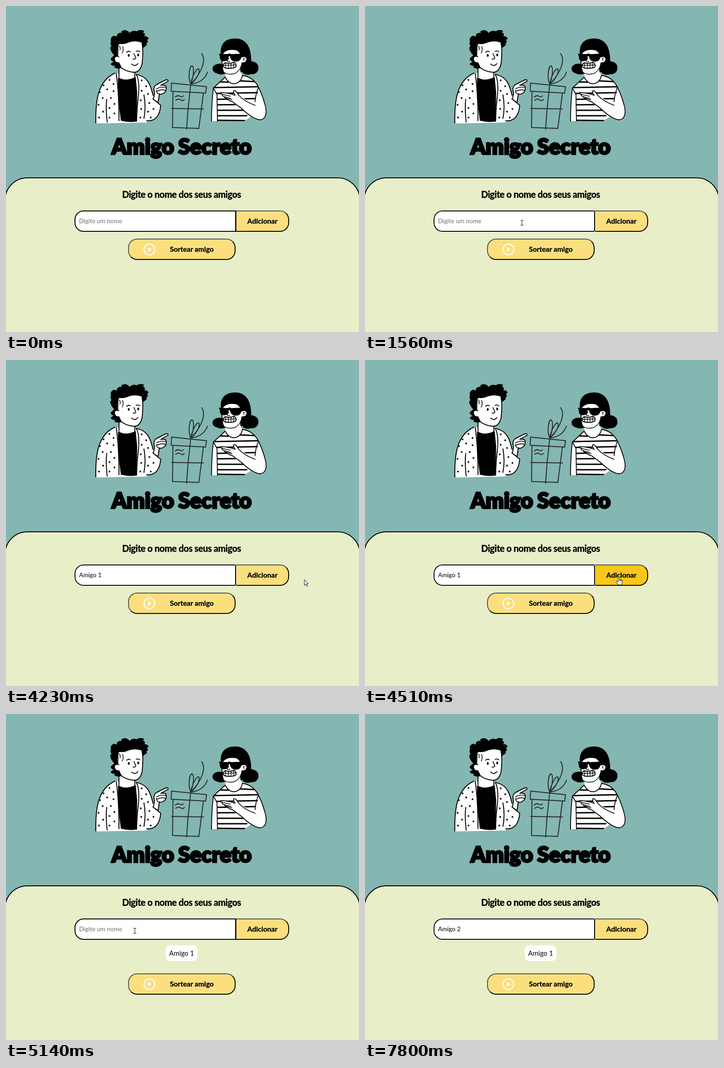
Write an HTML page that moves like this. It is 778 px wide and 719 px high and loops after 8000 ms.

```html
<!DOCTYPE html>
<html lang="pt-BR">
<head>
<meta charset="utf-8">
<title>Amigo Secreto</title>
<style>
html, body { margin: 0; width: 100%; height: 100%; overflow: hidden; background: #84b6b2; }
body { position: relative; font: 15.6px Lato, "Open Sans", sans-serif; color: #000; }
body > * { position: absolute; box-sizing: border-box; white-space: pre; text-align: center; }
#art { left: 0; top: 0; }
h1, h2 { margin: 0; left: 0; width: 774px; }
h1 { top: 279px; line-height: 60px; font-size: 47px; font-weight: 900; word-spacing: -2px; -webkit-text-stroke: 3.4px #000; }
h2 { top: 400px; line-height: 30px; font-size: 20px; letter-spacing: -.4px; -webkit-text-stroke: .4px #000; }
#panel { left: -3px; top: 378px; width: 784px; height: 400px; border: 2px solid #000; border-radius: 50px; background: #e8eec8; }
#field { left: 151px; top: 451px; width: 356px; height: 47px; border: 2px solid #000; border-radius: 20px 0 0 20px;
  background: #fff; padding-left: 8px; text-align: left; font-size: 13.6px; line-height: 43px; }
#field.focus { border-radius: 20px 3px 3px 20px; outline: 1px solid #fffc; }
#hint { color: #6e6e6e; }
#caret { position: absolute; top: 13px; width: 1px; height: 18px; background: #000; }
.btn { height: 47px; border: 2px outset #000; background: #fbdf7e; font-weight: 700; line-height: 42px; -webkit-text-stroke: .3px #000; }
.btn.hover { background: #fcc71a; }
#add { left: 506px; top: 451px; width: 118px; border-radius: 0 20px 20px 0; }
#draw { left: 269px; width: 237px; border-radius: 20px; padding-left: 44px; }
#draw svg { position: absolute; left: 31px; top: 8px; }
#chip { left: 352px; top: 510px; width: 70px; height: 35px; border-radius: 11px; background: #fff; font-size: 15px; line-height: 34px; }
#mouse { left: 0; top: 0; overflow: visible; }
</style>
</head>
<body>
<div id="panel"></div>
<svg id="art" width="778" height="378" fill="none" stroke="#000" stroke-width="2" stroke-linecap="round" stroke-linejoin="round">
  <!-- man -->
  <path fill="#fff" stroke="none" d="M198 259C197 210 202 165 240 148L290 150C312 155 318 170 324 197L340 218C340 240 330 255 312 254L309 257Z"/>
  <path d="M198 258C197 210 202 165 240 148M288 151C310 155 318 170 324 197M223 256C221 238 220 222 222 206M304 196C307 212 308 228 304 248M324 205L341 219C339 242 329 255 310 253"/>
  <path stroke-width="3.8" d="M215 175h0M228 163h0M237 172h0M223 184h0M207 190h0M237 188h0M213 203h0M231 203h0M204 218h0M239 216h0M228 225h0M214 233h0M205 246h0M239 237h0M228 246h0M299 164h0M309 177h0M299 187h0M313 194h0M297 208h0M316 214h0M298 227h0M313 233h0M325 227h0M296 246h0M319 246h0"/>
  <path fill="#fff" stroke="none" d="M249 122L285 140 287 170 248 170Z"/>
  <path fill="#000" d="M248 159Q266 168 285 158L288 190 287 254Q268 256 254 252Q247 200 248 159Z"/>
  <path d="M243 149Q249 190 249 253M287 151Q296 166 291 205Q288 232 288 254M249 137V157M284 146V157"/>
  <path fill="#fff" d="M324 205Q329 196 326 184Q326 177 332 173L352 163Q358 161 357 166L341 175Q352 173 353 179Q354 188 348 192Q342 196 338 194L335 213Z"/>
  <path d="M332 183Q340 177 351 180M333 188Q342 183 351 186M338 194Q331 193 332 186" stroke-width="1.6"/>
  <path fill="#fff" d="M247 84Q270 72 300 78Q303 100 300 127Q295 148 280 146Q264 144 254 136L246 120Z"/>
  <path fill="#000" stroke-width="1" d="M246 92Q243 102 246 112Q239 109 238 117Q240 125 249 126L253 137Q245 139 239 135L242 131Q235 133 231 128L238 122Q230 121 232 115L239 109Q231 100 230 92L233 88Q229 82 232 79Q229 69 238 66L245 68Q243 58 257 60L254 57Q260 51 269 56L272 60Q279 53 288 56L285 60Q292 50 304 55L301 59Q307 59 305 66L302 68Q311 65 314 72L310 75Q315 80 309 82L310 86 301 93L299 80Q284 75 270 80Q260 85 249 83Q247 87 246 92Z"/>
  <path fill="#fff" stroke-width="1.6" d="M249 112Q240 109 239 116Q240 126 249 125"/>
  <path stroke-width="1.5" d="M257 89Q260 97 256 104M250 88Q253 93 251 97"/>
  <path stroke-width="1.8" d="M266 102Q270 98 274 101M287 100Q291 98 295 101M282 105L286 114Q286 118 280 117M277 128Q284 135 291 127"/>
  <path stroke-width="4" d="M270.5 108v2M291.5 107v2"/>
  <!-- gift -->
  <g stroke="#242a2a">
    <path d="M365 170L442 178 440 192 364 188ZM368 190L367 268 425 270 435 193M407 174L401 230 398 272M365 226L435 227"/>
    <path d="M373 201Q378 196 383 199T391 198M374 208Q380 203 385 207T393 206"/>
    <path d="M407 172C400 155 405 132 410 132C416 135 413 158 407 172C411 152 421 136 425 139C429 148 416 166 407 172M411 168C428 150 443 121 431 105M409 172Q436 168 444 146"/>
  </g>
  <!-- woman -->
  <path fill="#000" stroke-width="1" d="M474 108Q470 72 506 72Q540 73 540 122Q557 124 556 138Q554 151 540 150Q527 154 520 145L484 148Q474 153 464 148Q454 145 456 135Q461 126 476 128Z"/>
  <path fill="#fff" stroke="none" d="M453 254Q453 215 457 181L483 157Q485 150 483 146L516 138Q516 150 522 153Q544 156 556 178Q569 205 573 228Q575 250 559 251Q548 251 540 244L524 254Z"/>
  <clipPath id="shirt"><path d="M456 181L483 157Q493 171 505 171Q518 167 522 153Q540 156 551 170L558 184 549 207 526 254H466L465 194Z"/></clipPath>
  <path clip-path="url(#shirt)" stroke-width="3" d="M460 167L490 168M512 165L555 167M455 180L560 178M455 193L560 191M460 206L560 204M460 218L560 217M460 230L560 230M460 242L560 242M460 252L560 253"/>
  <path d="M453 254Q453 215 457 181L483 157Q492 174 506 171Q519 167 521 153Q544 156 556 178Q569 205 573 228Q575 250 559 251M457 181L465 195 466 254M556 180Q550 195 549 211" stroke-width="1.8"/>
  <path fill="#fff" stroke="none" d="M557 183L571 222Q574 251 558 250L540 242 502 215 495 201 512 196 549 219Z"/>
  <path fill="#fff" stroke-width="1.8" d="M549 219Q526 211 513 197Q505 184 502 187Q501 192 505 197Q489 191 473 191Q472 194 477 195Q475 198 481 200Q481 203 487 204Q490 209 499 211L518 225Q544 250 560 251"/>
  <path stroke-width="1.4" d="M477 195L495 199M481 200L496 204M487 204L498 207"/>
  <path fill="#fff" stroke-width="1.4" d="M477 106Q485 93 508 97Q518 103 519 113Q529 109 531 117Q530 126 520 125Q518 142 504 149Q490 153 480 146Q475 136 477 106Z"/>
  <path fill="#000" stroke-width="1.5" d="M470 106L489 107Q492 104 496 107L518 106 518 110Q518 122 506 122Q496 122 494 110L490 110Q490 122 479 121Q471 120 472 110Z"/>
  <path stroke-width="1.6" d="M491 115L487 121Q490 124 493 122M525 115Q522 117 525 120"/>
  <path fill="#fff" d="M483 125Q493 128 503 124Q508 127 507 134Q501 139 484 137Q478 135 478 130Z"/>
  <path stroke-width="1.4" d="M479 131L507 130M484 126V137M490 127V138M496 126V138M502 125V137"/>
</svg>
<h1>Amigo Secreto</h1>
<h2>Digite o nome dos seus amigos</h2>
<div id="add" class="btn">Adicionar</div>
<div id="field"><span id="typed"></span><i id="caret"></i><span id="hint">Digite um nome</span></div>
<div id="chip">Amigo 1</div>
<div id="draw" class="btn"><svg width="28" height="28"><circle cx="14" cy="14" r="11.8" fill="none" stroke="#fffbed" stroke-width="2.6"/><path d="M11 8.5V19.5L19 14Z" fill="#fffbed"/></svg>Sortear amigo</div>
<svg id="mouse" width="20" height="20" fill="#fff" stroke="#111" stroke-linejoin="round">
  <path id="arrow" d="M.5 .5V13L3.5 10.2 5.5 15 7.5 14 5.5 9.5H9.3Z"/>
  <path id="hand" d="M-2 1Q-2 -.5 -.5 -.5T1 1V6L6 7.5Q7.5 8 7 11L5 18H-2L-6 11.5Q-6.5 9.5 -4.5 9.5L-2 11.5ZM1 6V9M3 7V9.5M5 7.5V10"/>
  <path id="beam" fill="none" d="M-3 -5.5H-1Q0 -5.5 0 -4.5Q0 -5.5 1 -5.5H3M0 -5V5M-3 5.5H-1Q0 5.5 0 4.5Q0 5.5 1 5.5H3"/>
</svg>
<script>
const $ = id => document.getElementById(id);
const LOOP = 8000, ADDED = 4580, FOCUS = [1090, 5210], LEAVE = 7530;

// pointer positions: time, x, y
const path = [
  [250, 604, 683], [460, 445, 575], [600, 361, 514], [810, 346, 478],
  [3879, 346, 478], [3950, 430, 472], [4090, 735, 446], [4160, 748, 462], [4230, 657, 484],
  [4440, 562, 479], [4580, 557, 477], [4650, 557, 477],
  [4720, 540, 478], [5000, 310, 478], [5210, 271, 478], [7459, 271, 478], [7460, 321, 470], [LEAVE, 321, 470]
];
const words = [
  { text: "Amigo 1", keys: [2020, 2420, 2640, 2760, 2900, 3440, 3560] },
  { text: "Amigo 2", keys: [6010, 6340, 6540, 6670, 6800, 7140, 7260] }
];

function pointer(t) {
  if (t < path[0][0] || t >= LEAVE) return null;
  // the pointer moves in steps of 70 ms
  const phase = t < 2000 ? 40 : 30;
  if (t < 7460) t = Math.max(path[0][0], Math.floor((t - phase) / 70) * 70 + phase);
  const i = path.findIndex(p => p[0] > t), [t0, x0, y0] = path[i - 1], [t1, x1, y1] = path[i];
  const k = (t - t0) / (t1 - t0);
  return [x0 + (x1 - x0) * k, y0 + (y1 - y0) * k];
}

const show = (id, on) => $(id).style.display = on ? "" : "none";

function render(t) {
  const round = t < ADDED ? 0 : 1, { text, keys } = words[round];
  const focused = t >= FOCUS[round];
  const pressed = keys.filter(k => k <= t);
  const typed = text.slice(0, pressed.length);
  const lastKey = Math.max(FOCUS[round], ...pressed);
  const drawTop = round ? 572 : 513;

  $("typed").textContent = typed;
  show("hint", !typed);
  show("caret", focused && (t - lastKey) % 1000 < (typed ? 520 : 460));
  $("field").classList.toggle("focus", focused);
  show("chip", round);
  $("draw").style.top = drawTop + "px";

  const p = pointer(t);
  const inside = (x, y, w) => !!p && p[0] >= x && p[0] < x + w && p[1] >= y && p[1] < y + 47;
  const onAdd = inside(507, 451, 117), onDraw = inside(269, drawTop, 237), onField = inside(151, 451, 356);
  $("add").classList.toggle("hover", onAdd);
  $("draw").classList.toggle("hover", onDraw);
  show("mouse", p);
  show("hand", onAdd || onDraw);
  show("beam", onField);
  show("arrow", !onAdd && !onDraw && !onField);
  if (p) $("mouse").style.transform = `translate(${Math.round(p[0])}px, ${Math.round(p[1])}px)`;
}

const start = performance.now();
function frame() {
  render((performance.now() - start) % LOOP);
  requestAnimationFrame(frame);
}
frame();
</script>
</body>
</html>
```
